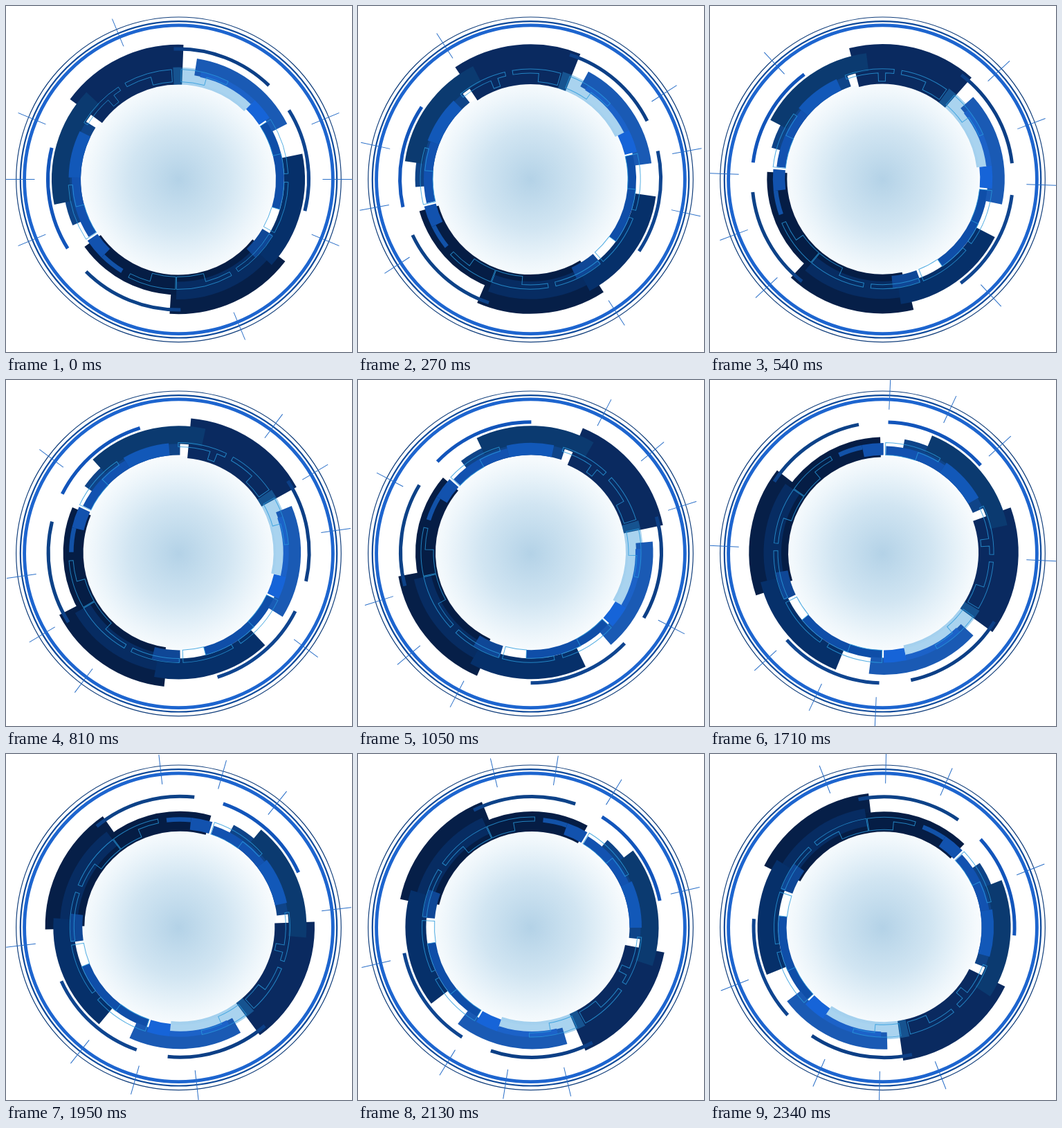
Animation of 500x500 px, one loop 2.37 s. Source, as an HTML page with a canvas:

```html
<!DOCTYPE html>
<html>
<head>
<meta charset="utf-8">
<style>
html, body { margin: 0; width: 100%; height: 100%; overflow: hidden; background: #fff; }
canvas { display: block; }
</style>
</head>
<body>
<canvas id="stage" width="500" height="500"></canvas>
<script>
const ctx = document.getElementById('stage').getContext('2d');
const LOOP = 2370, STEP = 30;
const DIAL_SPEED = 0.0725;       // degrees per ms, clockwise
const TICK_SPEED = -90 / LOOP;
const DIAL_OFFSET = -1.3;        // the dial sits slightly off its pivot

// Angles are degrees clockwise from the top.
const rad = deg => (deg - 90) * Math.PI / 180;

// colour, inner radius, outer radius, start angle, end angle
const bands = [
  ['#0a2a60', 137, 194.7, 306.5, 362.2],
  ['#0f4488', 141, 166.5, 246.5, 302],
  ['#0b3a70', 157, 183, 258.5, 313.5],
  ['#1252b0', 141, 154, 237.3, 271],
  ['#1258b8', 141, 158.5, 271, 296],
  ['#061f48', 162, 194.7, 127.5, 183.7],
  ['#051d45', 138, 167, 129, 234.3],
  ['#072c62', 148, 173.5, 128, 181],
  ['#06306a', 153, 183, 78.3, 132.5],
  ['#1252ae', 141, 158.5, 224.5, 235.9],
  ['#1252a8', 152, 158.5, 211.5, 224.5],
  ['#0f4796', 141, 158.5, 120.5, 135.5],
  ['#0f4ea8', 141, 153, 57, 106.5],
  ['rgba(40,145,215,.4)', 137, 162, -2.7, 44],
  ['#1a5ab4', 152, 176.5, 8.8, 63],
  ['#1c62c8', 151, 159, 12, 44],
  ['#1664d8', 141, 159, 44, 56],
  ['#0c3f86', 186, 191, -2, 44],
  ['#0f4590', 186, 191, 58, 104],
  ['#0d4288', 186, 191, 179, 225],
  ['#1255bb', 186, 191, 238, 284]
];

// Outlines: thin end angle, step angle, wide end angle
const brackets = [
  [27, 15.5, 1.5], [331, 345, 356.5], [87, 76, 57], [91.5, 106.5, 119],
  [151, 165, 181], [207, 195.5, 181.5], [267, 255, 237]
];
const ticks = [67.5, 90, 112.5, 157.5, 247.5, 270, 292.5, 337.5];

function band(color, r0, r1, from = 0, to = 360) {
  ctx.strokeStyle = color;
  ctx.lineWidth = r1 - r0;
  ctx.beginPath();
  ctx.arc(0, 0, (r0 + r1) / 2, rad(from), rad(to));
  ctx.stroke();
}

// Closed outline of [radius, from, to] arcs joined by straight edges
function outline(...arcs) {
  ctx.beginPath();
  for (const [r, from, to] of arcs) ctx.arc(0, 0, r, rad(from), rad(to), to < from);
  ctx.closePath();
  ctx.stroke();
}

function drawDial() {
  ctx.translate(DIAL_OFFSET, 0);
  for (const b of bands) band(...b);
  ctx.strokeStyle = 'rgba(42,154,220,.8)';
  ctx.lineWidth = 1;
  for (const [thin, step, wide] of brackets)
    outline([159, thin, wide], [141, wide, step], [153, step, thin]);
  outline([159, 121, 147], [153, 147, 121]);
  outline([159, 301, 327], [153, 327, 322.5], [141, 322.5, 318.5], [153, 318.5, 301]);
}

function drawTicks() {
  ctx.strokeStyle = '#2a6fc8';
  ctx.lineWidth = 1;
  ctx.beginPath();
  for (const deg of ticks) {
    const x = Math.cos(rad(deg)), y = Math.sin(rad(deg));
    ctx.moveTo(208 * x, 208 * y);
    ctx.lineTo(251 * x, 251 * y);
  }
  ctx.stroke();
}

function drawAt(x, y, deg, draw) {
  ctx.save();
  ctx.translate(x, y);
  ctx.rotate(deg * Math.PI / 180);
  draw();
  ctx.restore();
}

const glow = ctx.createRadialGradient(0, 0, 0, 0, 0, 142);
glow.addColorStop(0, 'rgba(20,115,180,.32)');
glow.addColorStop(0.5, 'rgba(25,125,190,.2)');
glow.addColorStop(0.85, 'rgba(30,135,200,.08)');
glow.addColorStop(1, 'rgba(30,140,205,.03)');

function drawBackdrop() {
  ctx.fillStyle = glow;
  ctx.beginPath();
  ctx.arc(0, 0, 141, 0, 7);
  ctx.fill();
  band('#123f7c', 234.2, 235.4);
  band('#0f4a9a', 227.6, 229.8);
  band('#1d65cf', 220.5, 225.3);
}

function frame() {
  const t = Math.floor(performance.now() % LOOP / STEP) * STEP;
  ctx.fillStyle = '#fff';
  ctx.fillRect(0, 0, 500, 500);
  drawAt(249.5, 250.8, 0, drawBackdrop);
  drawAt(249.5, 250.5, t * TICK_SPEED, drawTicks);
  drawAt(250.3, 250.5, t * DIAL_SPEED, drawDial);
  requestAnimationFrame(frame);
}
frame();
</script>
</body>
</html>
```
